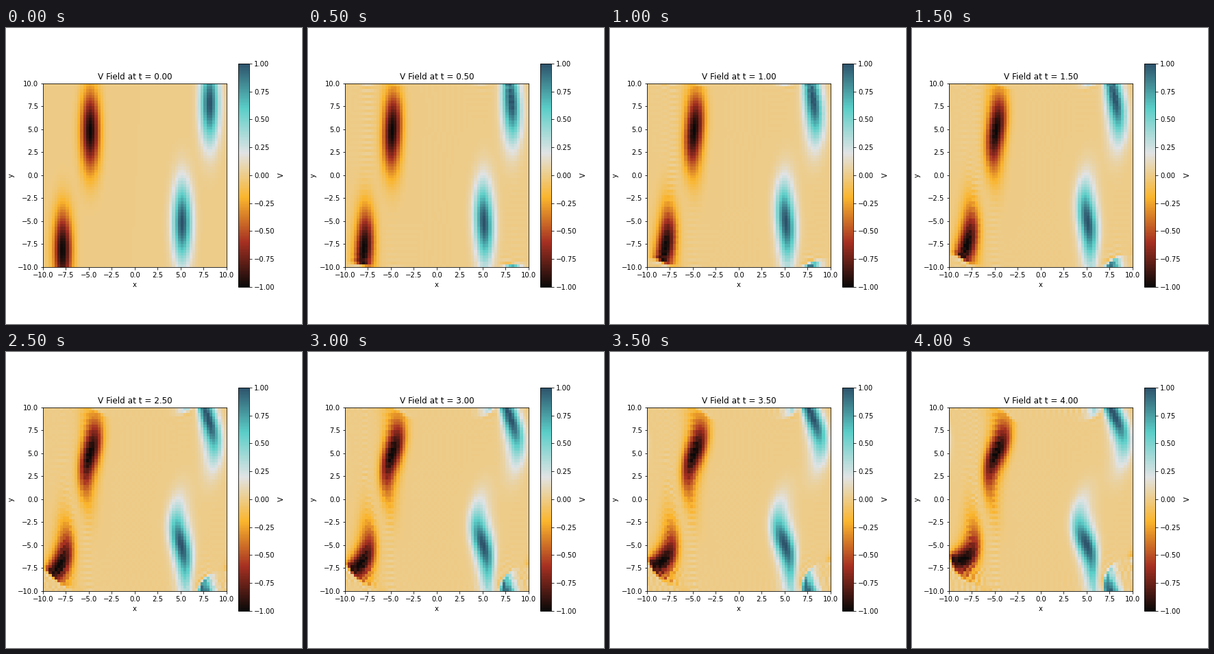
A matplotlib script for the animation above (4500 ms loop, 432 by 432 pixels).

```python
import numpy as np
import matplotlib.pyplot as plt
from matplotlib.animation import FuncAnimation
from matplotlib.colors import LinearSegmentedColormap

N, L = 64, 20.0
DT, STEPS = 0.025, 20          # solver step, steps per displayed frame
FRAMES, INTERVAL = 9, 500

COLORS = ["#0a0909", "#a63022", "#fab52d", "#e1e3e4", "#5bcec8", "#2d526a"]
cmap = LinearSegmentedColormap.from_list("firewater", COLORS, N=256)

# Rows run downwards, columns to the right.
pos = -L / 2 + np.arange(N) * L / N
X, S = np.meshgrid(pos, pos)
k = 2 * np.pi * np.fft.fftfreq(N, L / N)
KX, KS = np.meshgrid(k, k)
K2 = KX**2 + KS**2
K2[0, 0] = 1.0


def blob(x0, s0):
    return np.exp(-(X - x0)**2 - (S - s0)**2 / 18)


def inv(f):
    return np.fft.ifft2(f).real


def advect(w):
    """Rate of change of vorticity carried by its own flow."""
    wh = np.fft.fft2(w)
    psi = -wh / K2
    psi[0, 0] = 0
    u, v = inv(1j * KS * psi), -inv(1j * KX * psi)
    return -(u * inv(1j * KX * wh) + v * inv(1j * KS * wh))


def step(w):
    a = advect(w)
    b = advect(w + DT / 2 * a)
    c = advect(w + DT / 2 * b)
    d = advect(w + DT * c)
    return w + DT / 6 * (a + 2 * b + 2 * c + d)


def simulate():
    w = blob(5, 5) + blob(8, -8) - blob(-5, -5) - blob(-8, 8)
    fields = [w]
    for _ in range(FRAMES - 1):
        for _ in range(STEPS):
            w = step(w)
        fields.append(w)
    return fields


fields = simulate()

plt.rcParams.update({"font.family": "DejaVu Sans", "font.size": 10,
                     "figure.subplot.bottom": 0.125})
fig, ax = plt.subplots(figsize=(6, 6), dpi=72)
img = ax.imshow(fields[0], cmap=cmap, vmin=-1, vmax=1,
                extent=[-L / 2, L / 2, -L / 2, L / 2], interpolation="nearest")
fig.colorbar(img, ax=ax, label="V")
ax.set_xlabel("x")
ax.set_ylabel("y")
title = ax.set_title("V Field at t = 0.00")


def update(i):
    img.set_data(fields[i])
    title.set_text(f"V Field at t = {i * DT * STEPS:.2f}")
    return img, title


anim = FuncAnimation(fig, update, frames=FRAMES, interval=INTERVAL,
                     repeat=True, repeat_delay=0, blit=False)
plt.show()
```
